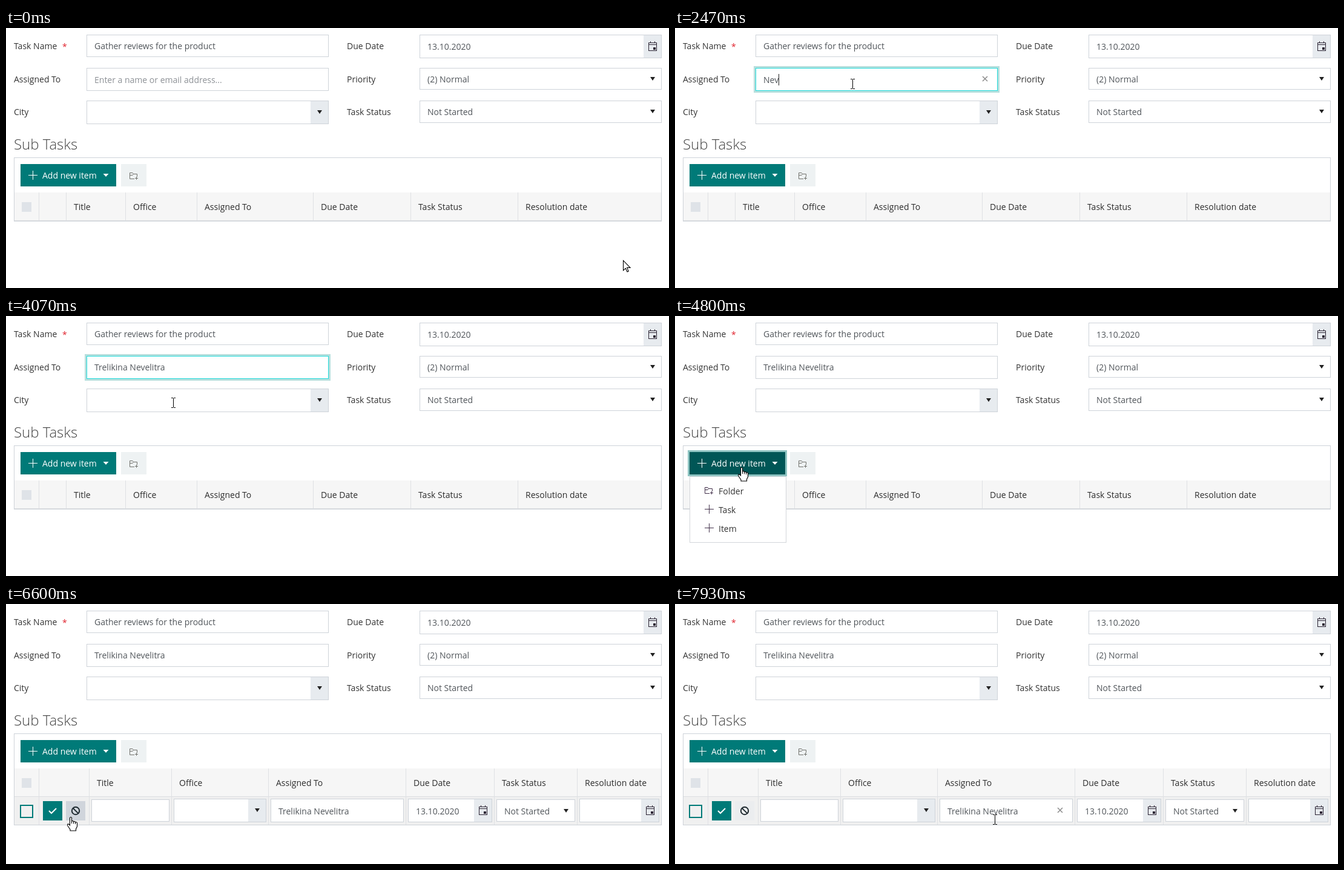
Recreate the animation shown at these times as an HTML page with a canvas. Size 1095 px wide and 430 px high, loop 8000 ms.

```html
<!DOCTYPE html>
<html lang="en">
<head>
<meta charset="utf-8">
<title>Task form</title>
<style>
  html, body { margin: 0; width: 100%; height: 100%; overflow: hidden; background: #fff; }
  canvas { display: block; }
</style>
</head>
<body>
<canvas id="stage" width="1095" height="430"></canvas>
<script>
const ctx = document.getElementById('stage').getContext('2d');
const LOOP = 8000, STEP = 1000 / 15;
const TEAL = '#007a78', DARK_TEAL = '#005656', BORDER = '#ced3d9', PANEL = '#e7ebef';
const INK = '#333', VALUE = '#50555a', ICON = '#2b2333';
const PERSON = 'Trelikina Nevelitra', TYPED = 'Neve';
const KEY_TIMES = [1730, 1930, 2400, 2670];

// Pointer stops: time, x, y
const POINTER = [
  [0, 1019, 384], [870, 287, 90], [1070, 287, 90], [1330, 293, 92],
  [2930, 293, 92], [3200, 291, 107], [3730, 293, 132], [3930, 293, 132],
  [4670, 110, 250], [5200, 110, 250], [5930, 105, 351], [6400, 105, 351],
  [7070, 115, 355], [7130, 115, 355], [7930, 528, 356], [8000, 528, 356]
];
const ARROW = new Path2D('M.5.5V17L4.3 13.4 7 19.2 9.2 18.2 6.6 12.4H12Z');
const HAND = new Path2D('M-1.5 1.5Q0-.5 1.5 1.5V7Q4 6 4.5 8Q7 7 7.5 9Q10.5 8 10.5 11V16L8.5 20V23H-1V21L-5 15Q-6 13-5 12Q-3.5 11.5-1.5 14Z');

const clamp = v => Math.min(1, Math.max(0, v));
const between = (t, a, b) => t >= a && t < b;
const ramp = (t, start, length) => clamp((t - start) / length);
const mix = (a, b, k) => a + (b - a) * k;

function pointerAt(t) {
  const i = POINTER.findIndex((p, n) => n && t <= p[0]);
  const [t0, x0, y0] = POINTER[i - 1], [t1, x1, y1] = POINTER[i];
  const k = (t - t0) / (t1 - t0), ease = k * k * (3 - 2 * k);
  return { x: Math.round(mix(x0, x1, ease)), y: Math.round(mix(y0, y1, ease)) };
}

function fill(x, y, w, h, color) {
  ctx.fillStyle = color;
  ctx.fillRect(x, y, w, h);
}

function frame(x, y, w, h, color = BORDER, background = '#fff') {
  if (background) fill(x, y, w, h, background);
  ctx.strokeStyle = color;
  ctx.lineWidth = 1;
  ctx.strokeRect(x + .5, y + .5, w - 1, h - 1);
}

function text(string, x, y, color = INK, font = '14px') {
  ctx.font = font + ' "Open Sans", sans-serif';
  ctx.fillStyle = color;
  ctx.fillText(string, x, y);
}

function line(points, color, width = 1) {
  ctx.strokeStyle = color;
  ctx.lineWidth = width;
  ctx.beginPath();
  for (let i = 0; i < points.length; i += 2) ctx.lineTo(points[i], points[i + 1]);
  ctx.stroke();
}

function disc(x, y, r, color) {
  ctx.fillStyle = color;
  ctx.beginPath();
  ctx.arc(x, y, r, 0, 7);
  ctx.fill();
}

function arc(x, y, r, from, to, color, width) {
  ctx.strokeStyle = color;
  ctx.lineWidth = width;
  ctx.beginPath();
  ctx.arc(x, y, r, from, to);
  ctx.stroke();
}

function triangle(x, y, w = 8, h = 6, color = '#222') {
  ctx.fillStyle = color;
  ctx.beginPath();
  ctx.moveTo(x - w / 2, y - h / 2);
  ctx.lineTo(x + w / 2, y - h / 2);
  ctx.lineTo(x, y + h / 2);
  ctx.fill();
}

function plus(x, y, color, r = 7.5) {
  line([x - r, y, x + r, y], color);
  line([x, y - r, x, y + r], color);
}

function cross(x, y) {
  line([x - 4, y - 4, x + 4, y + 4], '#8f8f8f', 1.6);
  line([x - 4, y + 4, x + 4, y - 4], '#8f8f8f', 1.6);
}

function calendar(x, y) {
  frame(x - 7, y - 6, 14, 14, ICON, null);
  fill(x - 7, y - 3, 14, 1, ICON);
  fill(x - 4, y - 8, 1, 3, ICON);
  fill(x + 3, y - 8, 1, 3, ICON);
  fill(x + 1, y + 2, 4, 4, ICON);
}

function folder(x, y, color) {
  line([x + 8, y + 10.5, x + .5, y + 10.5, x + .5, y + .5, x + 5, y + .5,
    x + 6.5, y + 2.5, x + 12.5, y + 2.5, x + 12.5, y + 7], color);
  line([x + .5, y + 4.5, x + 5, y + 4.5, x + 6.5, y + 2.5], color);
  plus(x + 11.5, y + 9.5, color, 2.5);
}

function picker(x, y, w, h, icon) {
  frame(x, y, w, h);
  fill(x + w - 30, y + 1, 29, h - 2, PANEL);
  icon(x + w - 15, y + Math.floor(h / 2));
}

function glow(x, y, w, h, color) {
  ctx.strokeStyle = color;
  ctx.lineWidth = 3;
  ctx.strokeRect(x - 1.5, y - 1.5, w + 3, h + 3);
}

// Reveals a dropdown by sliding it down from its top edge.
function slide(x, y, w, h, amount, draw) {
  if (amount <= 0) return;
  ctx.save();
  ctx.beginPath();
  ctx.rect(x, y, w, h);
  ctx.clip();
  ctx.translate(0, -h * (1 - amount));
  draw();
  ctx.restore();
}

function spinner(x, y, t) {
  const a = t / 1000 * Math.PI * 2 - .9;
  for (const turn of [0, Math.PI]) {
    arc(x, y, 7.5, a + turn - .8, a + turn + .8, '#8c8c8c', 1.5);
    arc(x, y, 4, turn - a - .8, turn - a + .8, '#9a9a9a', 1.3);
  }
}

function drawForm() {
  text('Task Name', 13, 35);
  text('*', 93, 36, '#e0242f');
  text('Assigned To', 13, 90);
  text('City', 13, 144);
  text('Due Date', 563, 35);
  text('Priority', 563, 90);
  text('Task Status', 563, 144);

  frame(133, 11, 400, 37);
  text('Gather reviews for the product', 146, 35, VALUE);
  picker(133, 120, 400, 39, triangle2);
  picker(683, 11, 400, 39, calendar);
  text('13.10.2020', 696, 36, VALUE);
  frame(683, 66, 400, 36);
  text('(2) Normal', 696, 90, VALUE);
  triangle(1068, 84);
  frame(683, 120, 400, 37);
  text('Not Started', 696, 144, VALUE);
  triangle(1068, 138);
  text('Sub Tasks', 13, 201, '#444', '300 24px');
}

function triangle2(x, y) { triangle(x, y); }

function drawAssignee(t, hovered) {
  const focus = t < 4600 ? ramp(t, 790, 130) : 1 - ramp(t, 4600, 100);
  if (focus) glow(133, 66, 400, 38, `rgba(0,140,132,${.28 * focus})`);
  frame(133, 66, 400, 38, focus > .4 ? '#1fdcdc' : BORDER);

  if (t >= 3930) {
    text(PERSON, 146, 90, VALUE);
  } else {
    const count = KEY_TIMES.filter(k => t >= k).length;
    const typed = TYPED.slice(0, count);
    if (count) text(typed, 146, 91, VALUE);
    else text('Enter a name or email address...', 146, 91, '#8d9196');
    const last = count ? KEY_TIMES[count - 1] : 800;
    if (t >= 800 && (t - last) % 1060 < 525) {
      fill(146 + Math.round(ctx.measureText(typed).width) * (count > 0), 76, 1, 19, '#222');
    }
  }
  if (between(t, 1930, 2330) || between(t, 2670, 3600)) spinner(512, 85, t);
  else if (hovered && t >= 1930) cross(512, 84);
}

function drawSuggestion(t, hovered) {
  const amount = t < 3930 ? ramp(t, 2790, 120) : 1 - ramp(t, 3930, 100);
  slide(133, 107, 400, 63, amount, () => {
    frame(133, 107, 400, 63, '#d6d9dc');
    fill(135, 115, 397, 46, '#dedede');
    fill(137, 118, 392, 40, hovered ? '#f8f9fa' : '#fff');
    ctx.save();
    ctx.beginPath();
    ctx.rect(146, 117, 44, 37);
    ctx.clip();
    disc(168, 138, 20, '#b0b0b0');
    disc(168, 132, 8.5, '#fff');
    disc(168, 156, 14, '#fff');
    ctx.restore();
    text(PERSON, 206, 144);
  });
}

function drawGrid(editing, t, over) {
  frame(13, 214, 1070, editing ? 152 : 106);
  fill(14, 272, 1068, 47, '#f6f6f6');
  fill(14, 318, 1068, 1, '#dcdee1');
  fill(26, 288, 16, 16, '#dfe3e8');
  if (editing) fill(14, 319, 1068, 46, '#f0f0f0');

  const edges = editing ? [137, 273, 433, 660, 806, 943] : [99, 197, 315, 507, 668, 845];
  const titles = ['Title', 'Office', 'Assigned To', 'Due Date', 'Task Status', 'Resolution date'];
  const bottom = editing ? 365 : 318;
  fill(54, 272, 1, bottom - 272, '#dfe1e4');
  edges.forEach((x, i) => {
    fill(x, 272, 1, bottom - 272, '#dfe1e4');
    text(titles[i], x + 13, 301, '#2d2d2d');
  });
  if (editing) drawRow(over);

  const focused = between(t, 4600, 6400);
  if (focused) glow(24, 225, 158, 37, '#8fc4c2');
  fill(24, 225, 158, 37, over.button ? DARK_TEAL : TEAL);
  plus(44.5, 243.5, '#fff');
  text('Add new item', 60, 249, '#fff');
  triangle(165, 243.5, 9, 5, '#fff');
  fill(190, 225, 42, 37, '#eef2f3');
  folder(204, 239, '#71716c');
}

function drawRow(over) {
  ctx.strokeStyle = TEAL;
  ctx.lineWidth = 2;
  ctx.strokeRect(24, 333, 20, 20);
  fill(61, 326, 32, 32, TEAL);
  line([71, 342, 75, 346, 83, 338], '#fff', 2);
  fill(99, 326, 32, 32, over.cancel ? '#d0d5dc' : '#ebedef');
  arc(115, 342, 6.2, 0, 7, '#1f2a30', 2);
  line([110.6, 337.6, 119.4, 346.4], '#1f2a30', 2);

  frame(141, 323, 129, 37);
  picker(277, 322, 153, 39, triangle2);
  frame(437, 322, 220, 39);
  text(PERSON, 450, 348, VALUE);
  if (over.rowAssignee) cross(636, 341);
  picker(664, 322, 139, 39, calendar);
  text('13.10.2020', 677, 348, VALUE);
  frame(810, 323, 130, 37);
  text('Not Started', 823, 348, VALUE);
  triangle(925, 342);
  picker(947, 322, 132, 39, calendar);
}

function drawMenu(t, hoverY) {
  const amount = t < 6330 ? ramp(t, 4600, 120) : 1 - ramp(t, 6330, 120);
  slide(24, 265, 160, 110, amount, () => {
    frame(24, 265, 160, 110, '#d3d6da');
    ['Folder', 'Task', 'Item'].forEach((name, i) => {
      const y = 274 + i * 31;
      if (between(hoverY, y, y + 31)) fill(25, y, 158, 31, '#f8f9fa');
      if (i) plus(56.5, y + 14.5, '#44324c');
      else folder(49, 283, '#44324c');
      text(name, 72, y + 21);
    });
  });
}

function drawPointer(kind, { x, y }) {
  if (kind === 'text') {
    const beam = [[x - 3, y - 8, 3, 1], [x + 1, y - 8, 3, 1], [x, y - 7, 1, 15],
      [x - 3, y + 8, 3, 1], [x + 1, y + 8, 3, 1]];
    for (const bar of beam) fill(...bar, '#000');
    return;
  }
  ctx.save();
  ctx.translate(x, y);
  ctx.fillStyle = '#fff';
  ctx.strokeStyle = '#000';
  ctx.lineWidth = 1.1;
  const shape = kind === 'hand' ? HAND : ARROW;
  ctx.fill(shape);
  ctx.stroke(shape);
  if (kind === 'hand') {
    line([1.5, 7, 1.5, 11], '#000');
    line([4.5, 8, 4.5, 11.5], '#000');
    line([7.5, 9, 7.5, 12], '#000');
  }
  ctx.restore();
}

function draw(t) {
  const p = pointerAt(t);
  const inside = (l, top, r, b) => between(p.x, l, r) && between(p.y, top, b);
  const popupOpen = between(t, 2790, 4000), menuOpen = between(t, 4600, 6400), editing = t >= 6530;
  const over = {
    assignee: inside(133, 66, 533, 104),
    city: !popupOpen && inside(133, 120, 503, 159),
    suggestion: popupOpen && inside(135, 116, 531, 160),
    button: inside(24, 225, 182, 262),
    menu: menuOpen && inside(24, 274, 184, 367),
    cancel: editing && inside(99, 326, 131, 358),
    rowText: editing && (inside(141, 323, 270, 360) || inside(277, 322, 400, 361)),
    rowAssignee: editing && inside(437, 322, 657, 361)
  };

  fill(0, 0, 1095, 430, '#fff');
  drawForm();
  drawAssignee(t, over.assignee);
  drawGrid(editing, t, over);
  drawSuggestion(t, over.suggestion);
  drawMenu(t, over.menu ? p.y : -1);

  const hand = over.suggestion || over.button || over.menu || over.cancel;
  const beam = over.assignee || over.city || over.rowText || over.rowAssignee;
  drawPointer(hand ? 'hand' : beam ? 'text' : 'arrow', p);
}

const start = performance.now();
function tick() {
  const t = (performance.now() - start) % LOOP;
  draw(Math.min(LOOP, Math.round(Math.floor((t + 5) / STEP) * STEP / 10) * 10));
  requestAnimationFrame(tick);
}
tick();
</script>
</body>
</html>
```
